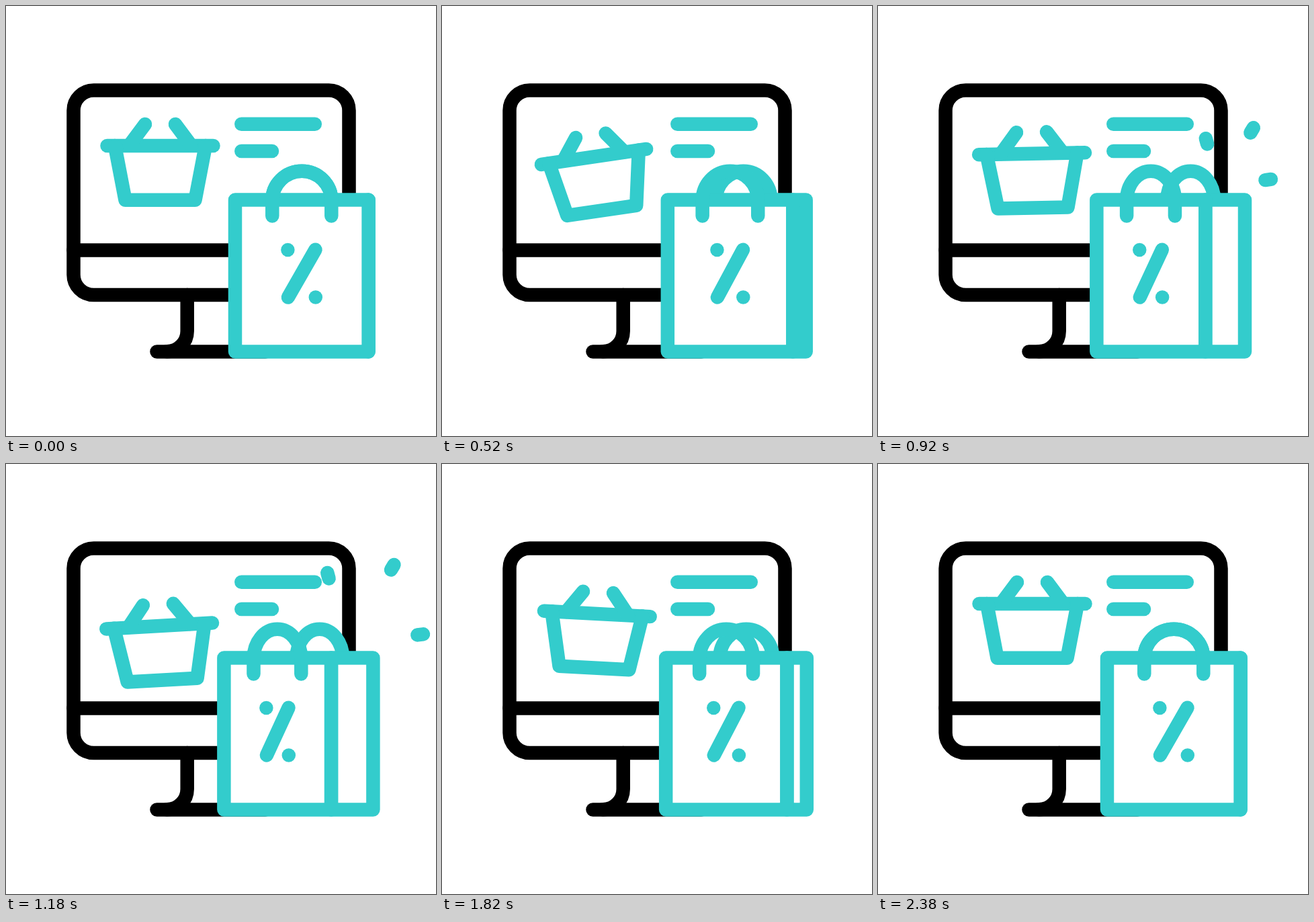
An HTML page with a canvas that plays this animation: 640x640 px, repeating every 2400 ms.

```html
<!DOCTYPE html>
<html lang="en">
<head>
<meta charset="utf-8">
<title>Online shopping</title>
<style>
  html, body { margin: 0; width: 100%; height: 100%; overflow: hidden; background: #fff; }
  canvas { display: block; width: 640px; height: 640px; }
</style>
</head>
<body>
<canvas id="stage" width="640" height="640"></canvas>
<script>
const ctx = document.getElementById('stage').getContext('2d');
const LOOP = 2400;
const TEAL = '#33cccc';
const BLACK = '#000';
const STROKE = 20.5;

const clamp = v => Math.min(1, Math.max(0, v));
const mix = (a, b, k) => a + (b - a) * k;
const smooth = v => { const u = clamp(v); return u * u * (3 - 2 * u); };
const cubic = u => u < 0.5 ? 4 * u ** 3 : 1 - 4 * (1 - u) ** 3;

function line(...points) {
  ctx.beginPath();
  points.forEach(([x, y]) => ctx.lineTo(x, y));
  ctx.stroke();
}

function dot(x, y) {
  ctx.beginPath();
  ctx.arc(x, y, STROKE / 2, 0, Math.PI * 2);
  ctx.fillStyle = TEAL;
  ctx.fill();
}

function panel(left, right) {
  ctx.beginPath();
  ctx.rect(left, 288.6, right - left, 225.8);
  ctx.fillStyle = '#fff';
  ctx.fill();
  ctx.stroke();
}

function handle(left, right, end) {
  ctx.beginPath();
  ctx.moveTo(left, end);
  ctx.lineTo(left, 289.5);
  ctx.ellipse((left + right) / 2, 289.5, (right - left) / 2, 43.7, 0, Math.PI, Math.PI * 2);
  ctx.lineTo(right, end);
  ctx.stroke();
}

// Basket swing: one pose every 360 ms, at rest after 2160 ms.
const BEAT = 360;
const DROP = [0, 53.8, -35.5, 45, -17.6, 15, 0];
const TILT = [0, -16.6, 2.9, -3.8, -0.7, 3.1, 0];

function swing(poses, t) {
  const i = Math.min(Math.floor(t / BEAT), poses.length - 2);
  return mix(poses[i], poses[i + 1], smooth(t / BEAT - i));
}

function drawBasket(t) {
  ctx.save();
  ctx.translate(229.5, 232 + swing(DROP, t));
  ctx.rotate(swing(TILT, t) * Math.PI / 180);
  line([-79, -24], [79, -24]);
  line([-67.5, -24], [-52, 56.8], [52, 56.8], [67.5, -24]);
  for (const side of [-1, 1]) line([side * 22.5, -56], [side * 46, -24.5]);
  ctx.restore();
}

function drawMonitor() {
  ctx.strokeStyle = BLACK;
  ctx.beginPath();
  ctx.roundRect(100.5, 125.5, 410, 304.5, 30);
  ctx.stroke();
  line([100.5, 363.5], [510.5, 363.5]);
  ctx.beginPath();
  ctx.moveTo(269.7, 430);
  ctx.lineTo(269.7, 484);
  ctx.arc(239.5, 484, 30.2, 0, Math.PI / 2);
  ctx.stroke();
  line([224.5, 514.4], [386, 514.4]);
}

function drawSparks(t) {
  const head = smooth((t - 840) / 290);
  const tail = smooth((t - 980) / 280);
  if (head <= 0 || tail >= head) return;
  const origin = [507, 268];
  for (const tip of [[478.3, 162], [577.5, 150], [621, 253.3]]) {
    const reach = Math.hypot(tip[0] - origin[0], tip[1] - origin[1]);
    const at = k => {
      const r = 1 - 45 * (1 - k) / reach;
      return [mix(origin[0], tip[0], r), mix(origin[1], tip[1], r)];
    };
    line(at(tail), at(head));
  }
}

function drawBag(t) {
  const turn = t < 1220 ? cubic(t / 1220) : 1 - cubic((t - 1220) / 1180);
  const edge = 539.6 - 55.6 * turn;
  handle(396.3 + 36 * turn, 484.3 + 17 * turn, 289.5);
  panel(edge, 539.6 + 6.8 * turn);
  panel(341 - 16.6 * turn, edge);
  handle(396.3 - 27.8 * turn, 484.3 - 45 * turn, 312.5);

  const left = 419.4 - 32 * turn;
  const right = 460.8 - 40 * turn;
  line([right - 0.3, 362.7], [left + 0.5, 433.5]);
  dot(left, 363);
  dot(right, 433.5);
}

function draw(t) {
  ctx.fillStyle = '#fff';
  ctx.fillRect(0, 0, 640, 640);
  ctx.lineWidth = STROKE;
  ctx.lineCap = ctx.lineJoin = 'round';
  ctx.strokeStyle = TEAL;
  drawBasket(t);
  drawMonitor();
  ctx.strokeStyle = TEAL;
  line([350.3, 175.7], [459.8, 175.7]);
  line([350.3, 216], [396, 216]);
  drawSparks(t);
  drawBag(t);
}

const start = performance.now();
function tick() {
  draw((performance.now() - start) % LOOP);
  requestAnimationFrame(tick);
}
tick();
</script>
</body>
</html>
```
